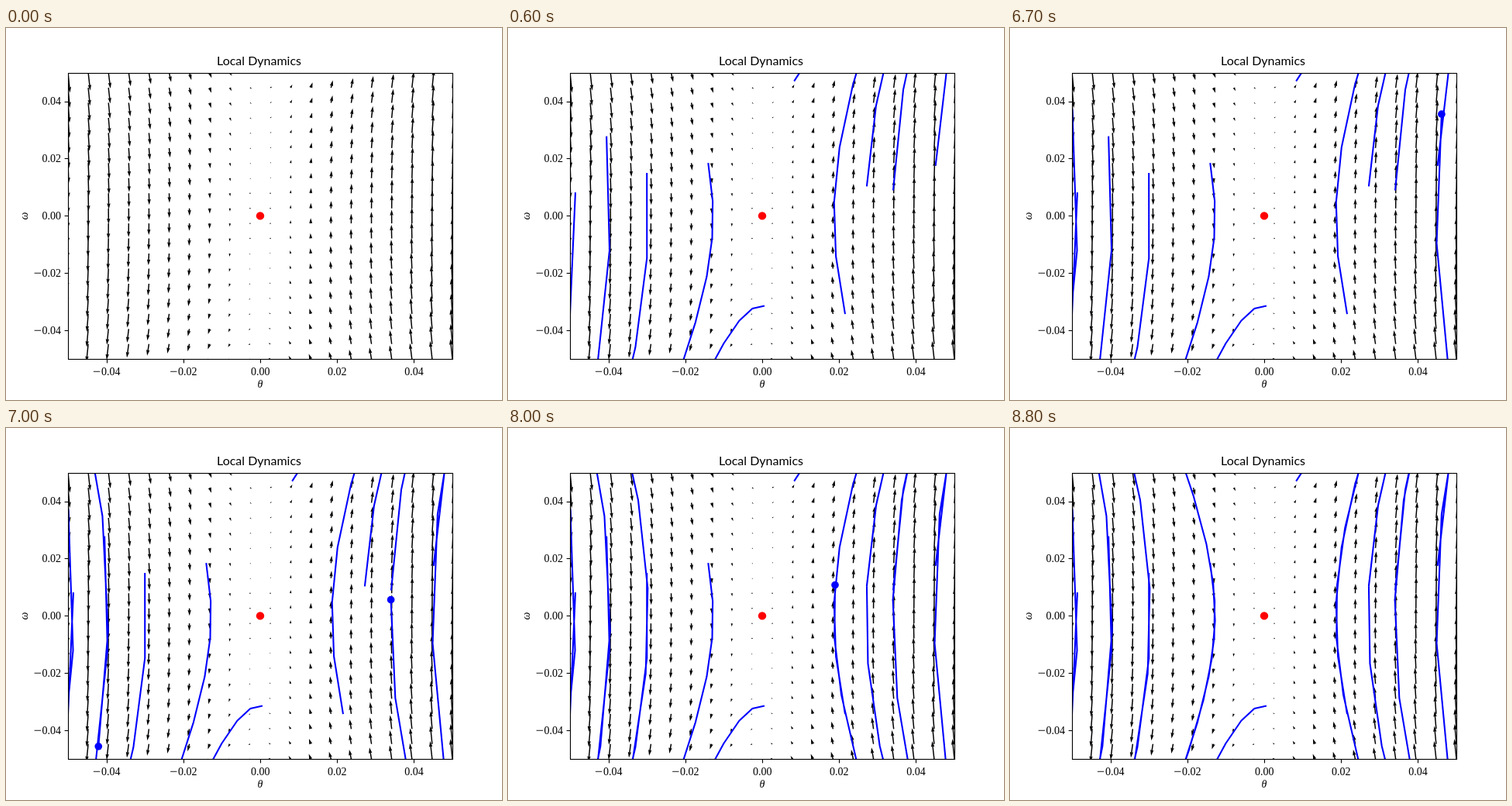
Write an HTML page with a canvas that moves like this. It is 640 by 480 pixels and loops after 9.9 s.

```html
<!DOCTYPE html>
<html lang="en">
<head>
<meta charset="utf-8">
<title>Local Dynamics</title>
<style>
html, body { margin: 0; overflow: hidden; background: #fff; }
canvas { display: block; }
</style>
</head>
<body>
<canvas id="stage" width="640" height="480"></canvas>
<script>
const ctx = document.getElementById('stage').getContext('2d');
const FRAME_MS = 100, FRAMES = 99, G = 10, GRID = 20;
const AXES = { left: 80, top: 57.6, width: 496, height: 369.6 };
const px = theta => AXES.left + (theta + 0.05) * 10 * AXES.width;
const py = omega => AXES.top + (0.05 - omega) * 10 * AXES.height;
const snap = v => Math.floor(v + 0.5) + 0.5;

// Initial (theta, omega) of each pendulum, theta measured from upright
const starts = [
  [-0.0486, 0.0082], [-0.0405, 0.0278], [-0.03, 0.015], [-0.01405, 0.0185],
  [0.0006, -0.0314], [0.02157, -0.0343], [0.0083, 0.047], [0.0272, 0.0103],
  [0.03407, 0.0089], [0.0451, 0.0175]
];

const flow = ([theta, omega]) => [omega, G * Math.sin(theta)];
const advance = (s, d, h) => [s[0] + h * d[0], s[1] + h * d[1]];

function rk4(s, h) {
  const a = flow(s);
  const b = flow(advance(s, a, h / 2));
  const c = flow(advance(s, b, h / 2));
  const d = flow(advance(s, c, h));
  return s.map((v, i) => v + h / 6 * (a[i] + 2 * b[i] + 2 * c[i] + d[i]));
}

function simulate(state) {
  const path = [state];
  while (path.length < FRAMES) {
    for (let i = 0; i < 20; i++) state = rk4(state, 0.005);
    path.push(state);
  }
  return path;
}

const paths = starts.map(simulate);

const arrows = [];
for (let i = 0; i < GRID; i++) {
  for (let j = 0; j < GRID; j++) {
    const state = [-0.05 + 0.1 * i / (GRID - 1), -0.05 + 0.1 * j / (GRID - 1)];
    const [u, v] = flow(state);
    arrows.push({ state, size: Math.hypot(u, v), angle: Math.atan2(-v, u) });
  }
}
const meanSize = arrows.reduce((sum, a) => sum + a.size, 0) / arrows.length;

function disc(x, y, r, color) {
  ctx.fillStyle = color;
  ctx.beginPath();
  ctx.arc(x, y, r, 0, 2 * Math.PI);
  ctx.fill();
}

// Arrow lengths are in units of the shaft width; short arrows shrink as a whole
function drawArrow({ state, size, angle }) {
  const length = size / (meanSize * 0.108);
  const tip = Math.max(length, 5);
  const scale = 0.003 * AXES.width * Math.min(1, length / 5);
  ctx.save();
  ctx.translate(px(state[0]), py(state[1]));
  if (length < 1) {
    disc(0, 0, 0.74, '#000');
  } else {
    ctx.rotate(angle);
    ctx.scale(scale, scale);
    ctx.fillStyle = '#000';
    ctx.beginPath();
    ctx.moveTo(0, 0.5);
    ctx.lineTo(tip - 4.5, 0.5);
    ctx.lineTo(tip - 5, 1.5);
    ctx.lineTo(tip, 0);
    ctx.lineTo(tip - 5, -1.5);
    ctx.lineTo(tip - 4.5, -0.5);
    ctx.lineTo(0, -0.5);
    ctx.fill();
  }
  ctx.restore();
}

function drawPath(path, count) {
  ctx.strokeStyle = '#00f';
  ctx.lineWidth = 2.08;
  ctx.lineJoin = 'round';
  ctx.beginPath();
  for (const [theta, omega] of path.slice(0, count)) ctx.lineTo(px(theta), py(omega));
  ctx.stroke();
  const [theta, omega] = path[count - 1];
  disc(px(theta), py(omega), 4.86, '#00f');
}

function text(str, x, y, align, font) {
  ctx.font = font;
  ctx.textAlign = align;
  ctx.fillText(str, x, y);
}

function tickLabel(value, right, y) {
  text(Math.abs(value).toFixed(2), right, y, 'right', '14px "Liberation Serif", serif');
  if (value < 0) text('−', right - 25.2, y + 1, 'right', '18px "Liberation Serif", serif');
}

function line(x1, y1, x2, y2) {
  ctx.beginPath();
  ctx.moveTo(x1, y1);
  ctx.lineTo(x2, y2);
  ctx.stroke();
}

function drawAxes() {
  const symbol = 'italic 14px "Liberation Serif", serif';
  ctx.fillStyle = ctx.strokeStyle = '#000';
  ctx.lineWidth = 1.11;
  ctx.lineJoin = 'miter';
  ctx.strokeRect(80.5, 58.5, 496, 369);
  for (let i = -2; i <= 2; i++) {
    const value = i * 0.02, x = px(value), y = py(value);
    line(snap(x), 427.5, snap(x), 432.4);
    line(75.6, snap(y), 80.5, snap(y));
    tickLabel(value, x + (value < 0 ? 17.8 : 12.4), 447.5);
    tickLabel(value, 71, y + 4.8);
  }
  text('Local Dynamics', 326.5, 48, 'center', '16px Lato, sans-serif');
  text('θ', 328, 464, 'center', symbol);
  ctx.save();
  ctx.translate(28, 242.5);
  ctx.rotate(-Math.PI / 2);
  text('ω', 0, 0, 'center', symbol);
  ctx.restore();
}

function render(now) {
  const frame = Math.floor(now / FRAME_MS) % FRAMES;
  ctx.fillStyle = '#fff';
  ctx.fillRect(0, 0, 640, 480);
  ctx.save();
  ctx.beginPath();
  ctx.rect(80, 58, 496, 369);
  ctx.clip();
  arrows.forEach(drawArrow);
  if (frame > 0) paths.forEach(path => drawPath(path, frame));
  disc(px(0), py(0), 5.2, '#f00');
  ctx.restore();
  drawAxes();
}

const startTime = performance.now();
function tick() {
  render(performance.now() - startTime);
  requestAnimationFrame(tick);
}
tick();
</script>
</body>
</html>
```
